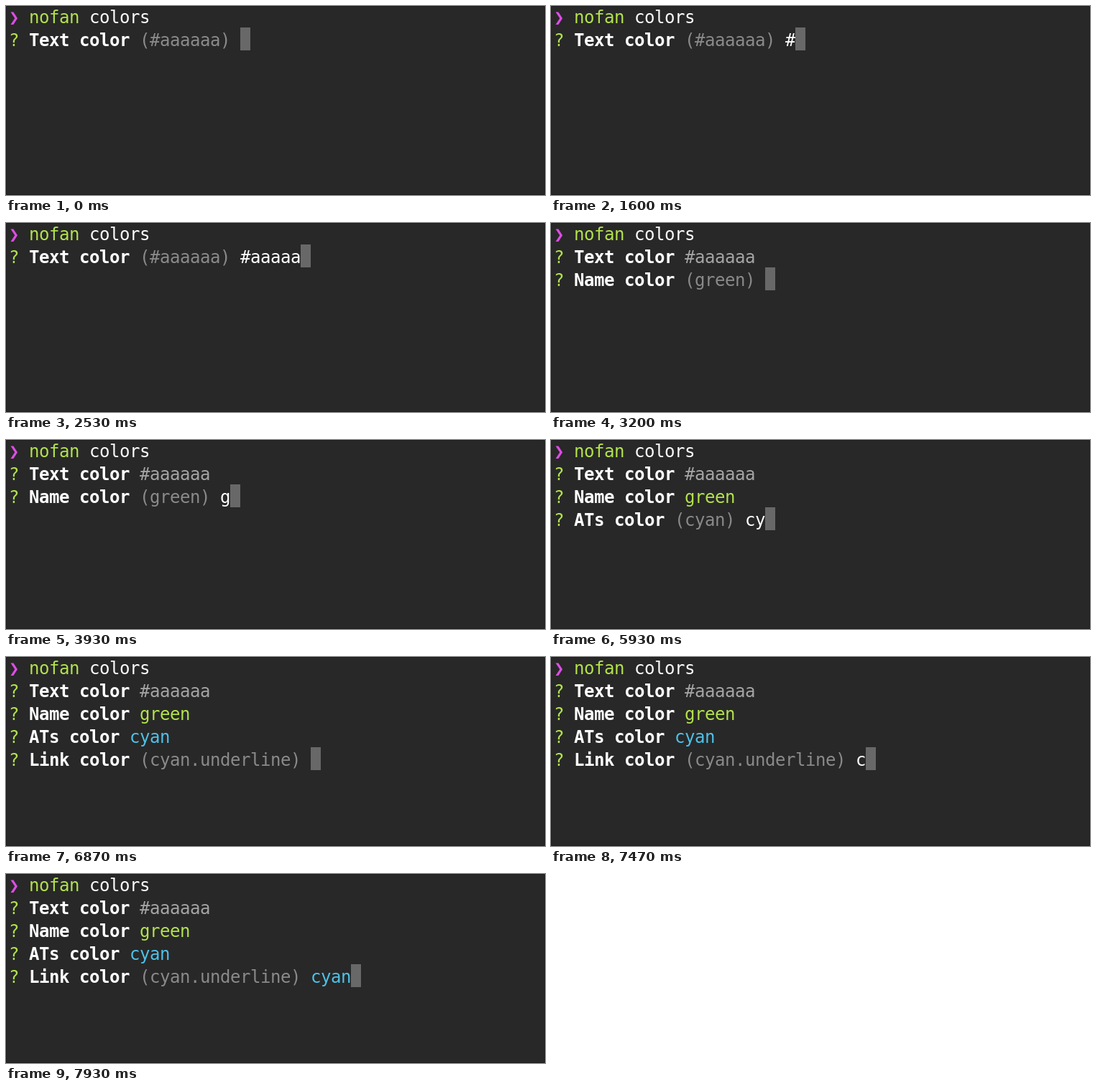
An HTML page that plays this animation: 750x264 px, repeating every 8 s.

```html
<!DOCTYPE html>
<html lang="en">
<head>
<meta charset="utf-8">
<title>Terminal colour prompts</title>
<style>
  html, body { margin: 0; width: 100%; height: 100%; overflow: hidden; background: #282828; }
  svg { display: block; width: 750px; height: 264px; }
  text {
    font: 24px "DejaVu Sans Mono", monospace;
    letter-spacing: -0.448px;
    white-space: pre;
  }
  .bold { font-weight: bold; }
</style>
</head>
<body>
<svg viewBox="0 0 750 264" xmlns="http://www.w3.org/2000/svg">
  <rect width="750" height="264" fill="#282828"/>
  <rect x="0.5" y="0.5" width="749" height="263" rx="2" fill="none" stroke="#1c1c1c"/>
  <g id="screen"></g>
</svg>
<script>
const LOOP = 8000;
const CELL = 14, ROW = 32, LEFT = 4, BASE = 24;
const WHITE = '#ffffff', DIM = '#8a8a8a', GREEN = '#b2e24c',
      CYAN = '#4ec1e8', PINK = '#dd4de4', GREY = '#a4a4a4', CURSOR = '#686868';

// keys: time of each keystroke; enter: time the answer is accepted
const prompts = [
  { label: 'Text', hint: '#aaaaaa', answer: '#aaaaaa',
    keys: [1400, 1665, 1860, 2045, 2230, 2415, 2595], enter: 3195 },
  { label: 'Name', hint: 'green', answer: 'green',
    keys: [3795, 4130, 4395, 4530, 4665], enter: 5065 },
  { label: 'ATs', hint: 'cyan', answer: 'cyan',
    keys: [5730, 5930, 6125, 6265], enter: 6665 },
  { label: 'Link', hint: 'cyan.underline', answer: 'cyan',
    keys: [7330, 7530, 7730, 7865], enter: Infinity }
];

const screen = document.getElementById('screen');

function tint(value) {
  if (value === 'green') return GREEN;
  if (value === 'cyan') return CYAN;
  return /^#(\w{3}|\w{6})$/.test(value) ? GREY : WHITE;
}

// Lays out [text, colour, bold] runs on one row, returns markup and end column
function line(row, runs) {
  let col = 0, markup = '';
  for (const [text, colour, bold] of runs) {
    markup += `<text x="${LEFT + col * CELL}" y="${BASE + row * ROW}" fill="${colour}"` +
              `${bold ? ' class="bold"' : ''}>${text}</text>`;
    col += text.length;
  }
  return { markup, col };
}

function cursor(row, col) {
  return `<rect x="${LEFT + col * CELL}" y="${row * ROW - 2}" width="${CELL}" height="${ROW}" fill="${CURSOR}"/>`;
}

function render(t) {
  let markup = line(0, [['❯ ', PINK], ['nofan ', GREEN], ['colors', WHITE]]).markup;
  for (const [i, p] of prompts.entries()) {
    const row = i + 1;
    const runs = [['? ', GREEN], [`${p.label} color `, WHITE, true]];
    if (t >= p.enter) {
      markup += line(row, [...runs, [p.answer, tint(p.answer)]]).markup;
      continue;
    }
    const typed = p.answer.slice(0, p.keys.filter(k => k <= t).length);
    const out = line(row, [...runs, [`(${p.hint}) `, DIM], [typed, tint(typed)]]);
    markup += out.markup + cursor(row, out.col);
    break;
  }
  return markup;
}

let shown = '';
const start = performance.now();

function tick() {
  const markup = render((performance.now() - start) % LOOP);
  if (markup !== shown) screen.innerHTML = shown = markup;
  requestAnimationFrame(tick);
}
tick();
</script>
</body>
</html>
```
